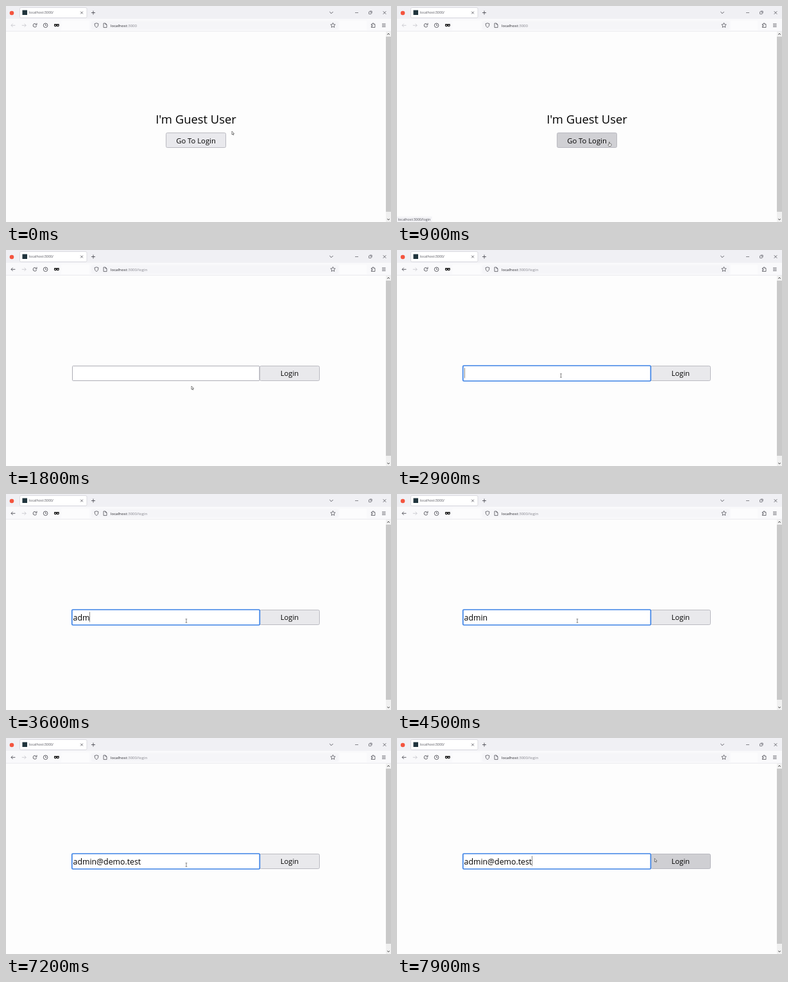
Write an HTML page with a canvas that moves like this. It is 600x338 px and loops after 8000 ms.

```html
<!DOCTYPE html>
<html lang="en">
<head>
<meta charset="utf-8">
<title>Login demo</title>
<style>
html, body { margin: 0; width: 100%; height: 100%; overflow: hidden; background: #fdfdfd; }
canvas { display: block; width: 600px; height: 338px; }
</style>
</head>
<body>
<canvas id="stage" width="600" height="338"></canvas>
<script>
const ctx = document.getElementById('stage').getContext('2d');
const LOOP = 8000;
const FONT = '"Open Sans", "Noto Sans", sans-serif';
const INK = '#3c3c44';

// [time, value] steps: the last one reached holds
const POINTER = [
  [0, [352, 196, 'arrow']], [500, [346, 211, 'arrow']],
  [900, [331, 213, 'hand']], [1000, [315, 213, 'hand']],
  [1100, [300, 213, 'hand']], [1200, [289, 213, 'hand']],
  [1600, [289, 213, 'arrow']], [2300, [285, 209, 'arrow']],
  [2400, [276, 202, 'beam']], [2500, [264, 198, 'beam']],
  [2600, [255.5, 196.5, 'beam']], [3000, [264, 197, 'beam']],
  [3100, [274, 198, 'beam']], [3200, [281, 198.5, 'beam']],
  [7700, [316, 197, 'beam']], [7800, [366, 194, 'beam']],
  [7900, [401.5, 188.5, 'arrow']]
];
const TYPED = [
  [0, ''], [3400, 'a'], [3500, 'ad'], [3600, 'adm'], [3900, 'admi'], [4000, 'admin'],
  [4700, 'admin@'], [5000, 'admin@d'], [5400, 'admin@dn'], [5800, 'admin@d'],
  [6000, 'admin@de'], [6100, 'admin@dem'], [6200, 'admin@demo'], [6400, 'admin@demo.'],
  [6600, 'admin@demo.t'], [6800, 'admin@demo.te'], [6900, 'admin@demo.tes'],
  [7100, 'admin@demo.test']
];
const CARET = [
  [0, false], [2900, true], [4500, false], [4700, true],
  [5600, false], [5800, true], [7200, false], [7700, true]
];

function at(steps, t) {
  let value = steps[0][1];
  for (const [time, v] of steps) if (t >= time) value = v;
  return value;
}

function rect(x, y, w, h, fill) {
  ctx.fillStyle = fill;
  ctx.fillRect(x, y, w, h);
}

function box(x, y, w, h, r, fill, stroke, width = 1) {
  ctx.beginPath();
  ctx.roundRect(x, y, w, h, r);
  if (fill) { ctx.fillStyle = fill; ctx.fill(); }
  if (stroke) { ctx.strokeStyle = stroke; ctx.lineWidth = width; ctx.stroke(); }
}

function line(points, color = INK, width = 0.8) {
  ctx.beginPath();
  for (let i = 0; i < points.length; i += 2) ctx.lineTo(points[i], points[i + 1]);
  ctx.strokeStyle = color;
  ctx.lineWidth = width;
  ctx.stroke();
}

function ring(x, y, r, color = INK, width = 0.8, from = 0, to = Math.PI * 2) {
  ctx.beginPath();
  ctx.arc(x, y, r, from, to);
  ctx.strokeStyle = color;
  ctx.lineWidth = width;
  ctx.stroke();
}

function disc(x, y, r, color) {
  ctx.beginPath();
  ctx.arc(x, y, r, 0, Math.PI * 2);
  ctx.fillStyle = color;
  ctx.fill();
}

// Draws a label and returns its width
function text(str, x, y, size, color = '#000', align = 'left') {
  ctx.font = size + 'px ' + FONT;
  ctx.textAlign = align;
  ctx.fillStyle = color;
  ctx.fillText(str, x, y);
  return ctx.measureText(str).width;
}

function arrowIcon(x, y, dir, color) {
  line([x - 3.2, y, x + 3.2, y], color);
  line([x + dir * 0.6, y - 2.6, x + dir * 3.2, y, x + dir * 0.6, y + 2.6], color);
}

function cross(x, y, r, color = INK) {
  line([x - r, y - r, x + r, y + r], color, 0.7);
  line([x - r, y + r, x + r, y - r], color, 0.7);
}

function star(x, y, r) {
  const pts = [];
  for (let i = 0; i <= 10; i++) {
    const a = -Math.PI / 2 + i * Math.PI / 5, k = i % 2 ? r * 0.48 : r;
    pts.push(x + k * Math.cos(a), y + k * Math.sin(a));
  }
  line(pts, INK, 0.7);
}

function tabStrip() {
  rect(0, 0, 600, 20, '#f0f0f4');
  disc(9, 11, 3.3, '#f4553f');
  box(21.5, 2.5, 104.5, 16, 2, '#fff', '#d3d3da', 0.8);
  rect(25.5, 6.5, 7.5, 7.5, '#20343c');
  text('localhost:3000/', 36, 12.4, 5.35, '#55555d');
  cross(118, 10.5, 1.9);
  line([133, 10.5, 139, 10.5]);
  line([136, 7.5, 136, 13.5]);
  line([504.3, 9, 507, 11.7, 509.7, 9]);
  line([544, 10.5, 549, 10.5], INK, 0.6);
  box(565.5, 9, 3.6, 3.6, 0.5, null, INK, 0.6);
  line([566.8, 8, 570.2, 8, 570.2, 11.4], INK, 0.6);
  cross(590, 10.5, 2.3);
}

function toolbar(login) {
  rect(0, 20, 600, 20, '#f9f9fb');
  rect(0, 39.4, 600, 0.6, '#e4e4e8');
  rect(86, 23, 44, 15, '#fcfcfd');
  rect(520, 23, 42, 15, '#fcfcfd');
  box(133, 23.5, 385, 13.5, 2, '#f5f5f8');

  arrowIcon(11.2, 30.3, -1, login ? INK : '#c4c4ca');
  arrowIcon(28, 30.3, 1, '#c4c4ca');
  ring(45, 30.3, 2.8, INK, 0.8, 0.2, 5.4);
  line([48, 26.8, 48, 29.4, 45.4, 29.4], INK, 0.8);
  ring(61.6, 30.3, 3.3);
  line([61.6, 28, 61.6, 30.5, 63.2, 30.5], INK, 0.7);
  ring(77, 30.3, 1.5, '#111', 1.3);
  ring(80.8, 30.3, 1.5, '#111', 1.3);
  line([75, 28.7, 82.8, 28.7], '#111', 0.9);

  ctx.beginPath();
  ctx.moveTo(141, 26.8);
  ctx.lineTo(144, 27.8);
  ctx.quadraticCurveTo(144, 32.2, 141, 33.8);
  ctx.quadraticCurveTo(138, 32.2, 138, 27.8);
  ctx.closePath();
  ctx.strokeStyle = INK;
  ctx.lineWidth = 0.7;
  ctx.stroke();
  line([152, 27, 155, 27, 157, 29, 157, 33.6, 152, 33.6, 152, 27], INK, 0.7);
  line([155, 27, 155, 29, 157, 29], INK, 0.6);

  const w = text('localhost', 163, 32.6, 6.1, '#26262c');
  text(login ? ':3000/login' : ':3000', 163 + w, 32.6, 6.1, '#85858c');

  star(509.5, 30.3, 3.9);
  line([569.4, 28.4, 571.2, 28.4, 571.2, 27, 573, 27, 573, 28.4, 575, 28.4,
    575, 33.5, 569.4, 33.5, 569.4, 31.9, 571, 31.9, 571, 30.1, 569.4, 30.1, 569.4, 28.4], INK, 0.7);
  for (let i = 0; i < 3; i++) line([586, 28 + i * 2.2, 591.6, 28 + i * 2.2], INK, 0.7);
}

function scrollbar() {
  rect(592, 40, 8, 298, '#f0f0f0');
  rect(592, 48, 8, 274, '#c9c9c9');
  line([594.2, 44.8, 596, 43, 597.8, 44.8], '#444', 1);
  line([594.2, 333, 596, 334.8, 597.8, 333], '#444', 1);
}

function button(label, x, y, fill, size, baseline) {
  box(x + 0.5, y + 0.5, 93, 23, 2, fill, '#b4b4bb', 0.9);
  text(label, x + 47, baseline, size, '#000', 'center');
}

function homePage(t) {
  text("I'm Guest User", 296, 184, 18.4, '#000', 'center');
  const fill = t >= 1400 ? '#b1b1b4' : t >= 900 ? '#d0d0d4' : '#e9e9ed';
  button('Go To Login', 249, 198, fill, 11.25, 214.5);
  if (t >= 900) {
    rect(0, 329.5, 54.5, 8.5, '#f3f3f6');
    text('localhost:3000/login', 1.7, 335.8, 5.4, '#4a4a52');
  }
}

function loginPage(t) {
  button('Login', 395, 181, t >= 7900 ? '#cfcfd3' : '#e9e9ec', 11.2, 197.3);
  if (t >= 2900) box(102.8, 181, 292.6, 24, 1.5, '#fff', '#3c82e6', 1.7);
  else box(103.5, 181.5, 291.5, 23, 1, '#fff', '#a4a4ae', 0.9);
  const w = text(at(TYPED, t), 104.6, 197.5, 12.3);
  if (at(CARET, t)) rect(Math.round(104.6 + w), 184.5, 0.7, 16, '#555');
}

function outline(points, x, y) {
  ctx.beginPath();
  for (let i = 0; i < points.length; i += 2) ctx.lineTo(x + points[i], y + points[i + 1]);
  ctx.closePath();
  ctx.fillStyle = '#fff';
  ctx.fill();
  ctx.strokeStyle = '#333';
  ctx.lineWidth = 0.6;
  ctx.stroke();
}

function pointer(x, y, kind) {
  if (kind === 'arrow') {
    outline([0, 0, 0, 5.2, 1.2, 4.1, 2, 6, 2.9, 5.6, 2.1, 3.8, 3.7, 3.7], x, y);
  } else if (kind === 'hand') {
    outline([-0.6, 0, 0.5, 0, 0.6, 2.3, 3, 3, 2.8, 5, 2.2, 6.5, -0.8, 6.5, -2.2, 4.2, -1.6, 3.6, -0.6, 4.2], x, y);
  } else {
    line([x, y - 2.6, x, y + 2.6], '#555', 0.7);
    line([x - 1.3, y - 2.8, x + 1.3, y - 2.8], '#555', 0.7);
    line([x - 1.3, y + 2.8, x + 1.3, y + 2.8], '#555', 0.7);
  }
}

function draw(t) {
  const login = t >= 1600;
  rect(0, 0, 600, 338, '#fdfdfd');
  tabStrip();
  toolbar(login);
  scrollbar();
  if (login) loginPage(t);
  else homePage(t);
  pointer(...at(POINTER, t));
}

const start = performance.now();
function tick() {
  draw((performance.now() - start) % LOOP);
  requestAnimationFrame(tick);
}
tick();
</script>
</body>
</html>
```
